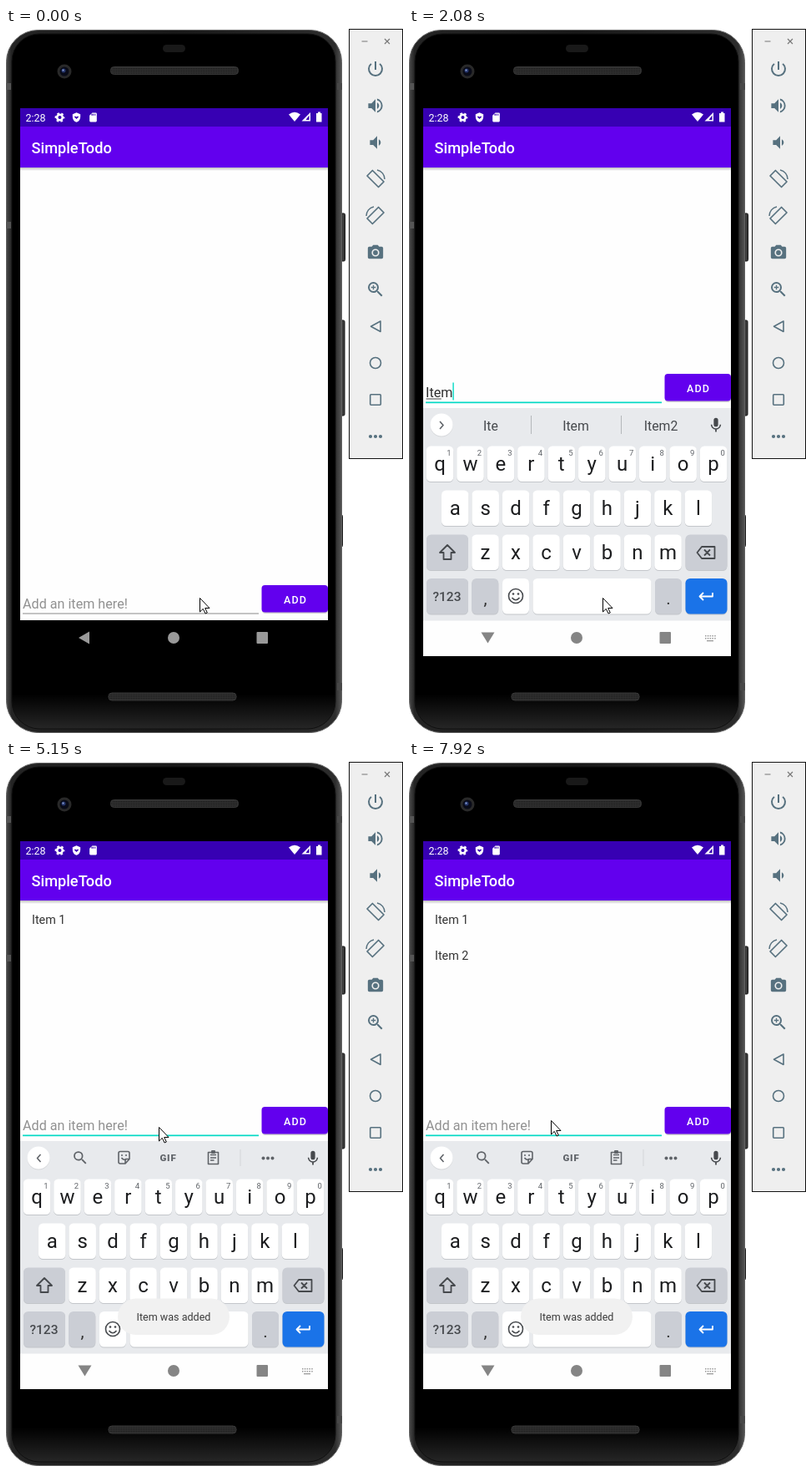
An HTML page that plays this animation: 476 by 844 pixels, repeating every 8 s.

```html
<!DOCTYPE html>
<html lang="en">
<head>
<meta charset="utf-8">
<title>Todo list demo</title>
<style>
  html, body { margin: 0; width: 100%; height: 100%; overflow: hidden; background: #fff; }
  svg { display: block; }
  text { font-family: Roboto, sans-serif; white-space: pre; }
  .mid { text-anchor: middle; }
  .key { font-size: 24px; fill: #1c1d1f; }
  .line { fill: none; stroke-linejoin: round; }
</style>
</head>
<body>
<svg id="stage" width="476" height="844" viewBox="0 0 476 844"></svg>
<script>
const LOOP = 8000;
const stage = document.getElementById('stage');
const $ = id => document.getElementById(id);

// ---- markup helpers ----
const rect = (x, y, w, h, fill, rx = 0, extra = '') =>
  `<rect x="${x}" y="${y}" width="${w}" height="${h}" fill="${fill}" rx="${rx}" ${extra}/>`;
const circle = (x, y, r, fill, extra = '') =>
  `<circle cx="${x}" cy="${y}" r="${r}" fill="${fill}" ${extra}/>`;
const path = (d, fill, extra = '') => `<path d="${d}" fill="${fill}" ${extra}/>`;
const line = (d, color, width = 1.6, extra = '') =>
  `<path class="line" d="${d}" stroke="${color}" stroke-width="${width}" ${extra}/>`;
const text = (x, y, size, fill, str, extra = '') =>
  `<text x="${x}" y="${y}" font-size="${size}" fill="${fill}" ${extra}>${str}</text>`;
const at = (x, y, body, scale = 1) => `<g transform="translate(${x} ${y}) scale(${scale})">${body}</g>`;
// Icon on a 24-unit grid, centred on (x, y).
const icon = (x, y, size, d, fill) =>
  at(x, y, `<g transform="translate(-12 -12)">${path(d, fill, 'fill-rule="evenodd"')}</g>`, size / 24);
const dots = (x, y, fill, step, r) => [-step, 0, step].map(d => circle(x + d, y, r, fill)).join('');

const LENS = 'M15.5 14h-.79l-.28-.27A6.47 6.47 0 0016 9.5 6.5 6.5 0 109.5 16c1.61 0 3.09-.59 4.23-1.57l.27.28v.79l5 5L20.5 19zm-6 0A4.5 4.5 0 119.5 5a4.5 4.5 0 010 9z';
const SPEAKER = 'M3 9v6h4l5 5V4L7 9zM14 8v8c1.5-.7 2.5-2.2 2.5-4S15.500 8.700 14 8z';
const ICONS = {
  power: 'M13 3h-2v10h2zm4.83 2.17l-1.42 1.42A7 7 0 1 1 7.580 6.580L6.170 5.170A9 9 0 1 0 17.830 5.170z',
  louder: SPEAKER + 'M14 3.230v2.060a7 7 0 0 1 0 13.420v2.060a9 9 0 0 0 0-17.540z',
  camera: 'M9 2L7.170 4H4a2 2 0 0 0-2 2v12a2 2 0 0 0 2 2h16a2 2 0 0 0 2-2V6a2 2 0 0 0-2-2h-3.170L15 2zM12 17a5 5 0 1 1 0-10 5 5 0 0 1 0 10zM12 15.200a3.200 3.200 0 1 0 0-6.400 3.200 3.200 0 0 0 0 6.400z',
  mic: 'M12 14a3 3 0 0 0 3-3V5a3 3 0 0 0-6 0v6a3 3 0 0 0 3 3zm5.300-3a5.300 5.300 0 0 1-10.600 0H5c0 3.410 2.720 6.230 6 6.720V21h2v-3.280c3.280-.48 6-3.300 6-6.720z',
  shield: 'M12 1L3 5v6c0 5.500 3.800 10.700 9 12 5.200-1.300 9-6.500 9-12V5zM12 16l-5-5 2-2 3 2 3-2 2 2z',
  card: 'M18 2h-8L4 8v12a2 2 0 0 0 2 2h12a2 2 0 0 0 2-2V4a2 2 0 0 0-2-2zM8 8h2v-4h-2zM11 8h2V4h-2zM15 8h2V4h-2z'
};

// ---- static parts ----
function phone() {
  const defs = `<defs>
    <linearGradient id="rim"><stop stop-color="#4a4a4a"/><stop offset=".015" stop-color="#242424"/>
      <stop offset=".5" stop-color="#181818"/><stop offset=".98" stop-color="#2c2c2c"/><stop offset="1" stop-color="#555"/></linearGradient>
    <linearGradient id="face" x2="0" y2="1"><stop offset=".95" stop-color="#000"/><stop offset="1" stop-color="#262626"/></linearGradient>
    <linearGradient id="drop" x2="0" y2="1"><stop stop-color="#000" stop-opacity=".25"/><stop offset="1" stop-color="#000" stop-opacity="0"/></linearGradient>
    <pattern id="mesh" width="2" height="2" patternUnits="userSpaceOnUse">${rect(0, 0, 2, 2, '#303030') + rect(0, 0, 1, 1, '#181818')}</pattern>
    <clipPath id="screen">${rect(17, 96, 369, 656, '#000')}</clipPath></defs>`;
  const grill = (x, y) => rect(x, y, 153, 9, 'url(#mesh)', 4, 'stroke="#383838"');
  const side = (y, h, w) => rect(401, y, w, h, '#3a3a3a', 1.5, 'stroke="#161616"');
  return defs + side(222, 57, 5.5) + side(350, 114, 5) + side(583, 38, 2.5) +
    rect(.5, 2.5, 402, 841, 'url(#rim)', 38, 'stroke="#626262"') +
    rect(7, 7, 388, 832, 'url(#face)', 33, 'stroke="#101010"') +
    rect(0, 66, 6, 8, '#555') + rect(0, 232, 6, 8, '#555') + rect(397, 66, 6, 8, '#484848') + rect(397, 784, 6, 9, '#484848') +
    grill(125.5, 46.5) + grill(123, 796) + rect(188, 20, 27, 9, '#191919', 4.5) +
    circle(70, 52, 8.500, '#292929') + circle(70, 52, 5.500, '#090b18') + circle(69, 51, 2.500, '#26366c') + circle(68.5, 50.5, 1, '#9aaee0');
}

function statusBar() {
  const w = '#fff';
  return rect(17, 96, 369, 22, '#3700b3') + text(23.5, 111.5, 12.5, w, '2:28') +
    circle(64.5, 107, 3.300, 'none', 'stroke="#fff" stroke-width="2.600"') +
    circle(64.5, 107, 5, 'none', 'stroke="#fff" stroke-width="1.800" stroke-dasharray="2.600 2.636" stroke-dashoffset="1.300"') +
    icon(84.5, 107, 12.5, ICONS.shield, w) + icon(104.5, 107, 13, ICONS.card, w) +
    path('M346 112l-7-8.500q7-5.500 14 0z', w) +
    path('M365 101v10.500h-10.500z', w) + path('M363.500 104.500v5.500h-4z', '#3700b3') +
    path('M372 102h2v-1.500h3V102h1.500v10.500H372z', w);
}

function appScreen() {
  return rect(17, 96, 369, 613, '#fefefe') + rect(17, 167, 369, 4, 'url(#drop)') +
    rect(17, 117, 369, 50, '#6200ee') + text(30.5, 149.5, 18.2, '#fff', 'SimpleTodo', 'font-weight="500"') +
    statusBar() +
    text(31, 194.5, 14.35, '#333', 'Item 1', 'id="item1"') +
    text(31, 237.5, 14.35, '#333', 'Item 2', 'id="item2"') +
    `<g id="field">` +
      rect(20, 700.5, 283, 1, '#8a8a8a', 0, 'id="rule"') +
      text(20, 694.5, 16.15, '#919191', 'Add an item here!', 'id="hint"') +
      text(20, 694.5, 16.15, '#2e2e2e', '', 'id="typed"') +
      rect(20.5, 696.5, 0, 1, '#444', 0, 'id="mark"') +
      rect(20, 677.5, 1.4, 21, '#03dac5', 0, 'id="caret"') +
      rect(307, 668.5, 79, 32.5, '#000', 4, 'opacity=".18"') +
      rect(306.5, 667, 79.5, 32.5, '#6200ee', 4, 'id="button"') +
      text(347, 688.500, 12.56, '#fff', 'ADD', 'class="mid" font-weight="500" letter-spacing="1.120"') +
    `</g>` +
    path('M87 730l13-7.500v15z', '#999') + circle(201, 730, 7, '#999') + rect(300.5, 723, 13.5, 14, '#999', 1);
}

function keyboard() {
  const ink = '#5f6368', dark = '#46494d', gray = '#cbced5';
  const cap = (x, y, w, fill = '#fff') => rect(x, y + 1, w, 42.5, '#c3c6ca', 5.5) + rect(x, y, w, 42.5, fill, 5.5);
  const row = (keys, x0, y, step, hints) => [...keys].map((k, i) => {
    const x = x0 + i * step;
    return cap(x - 16.200, y, 32.500) + text(x, y + 29.500, 24, '#1c1d1f', k, 'class="mid"') +
      (hints ? text(x + 11, y + 11, 9.5, ink, (i + 1) % 10, 'class="mid"') : '');
  }).join('');
  const tools = icon(89, 475, 21, LENS, ink) +
    line('M135 469.500q0-2 2-2h9q2 0 2 2v7l-5 5.500h-6q-2 0-2-2zM148 476.500h-3q-2 0-2 2v3M138.500 475q3 4 6 1', ink) +
    circle(139, 472, 1, ink) + circle(144, 472, 1, ink) +
    text(194.5, 479, 11.5, ink, 'GIF', 'class="mid" font-weight="900" letter-spacing=".8"') +
    line('M242.500 468.500h12v14h-12zM245 471.500h7M245 475h7M245 478h4.500', ink) + rect(246, 466, 5, 4, ink, 1) +
    rect(280.500, 465, 1, 20, '#d3d6d9') + dots(314, 475.500, ink, 5.5, 2) +
    line('M41.500 471l-4 4.500 4 4.500', ink);
  const words = [98, 200, 302].map((x, i) => text(x, 481.5, 15.8, dark, '', `class="mid" id="word${i}"`)).join('') +
    rect(146, 464, 1, 22, '#b4b7bb') + rect(254, 464, 1, 22, '#b4b7bb') + line('M37 471l4 4.500-4 4.500', ink);
  const mini = [0, 1, 2, 3, 4].map(i => rect(355 + i * 2.8, 727, 1.500, 1.500, '#999') + rect(355 + i * 2.8, 730, 1.500, 1.500, '#999')).join('');
  return `<g id="keys">` + rect(17, 455, 369, 297, '#e8eaed') + rect(17, 709.5, 369, 42.5, '#fefefe') +
    circle(39, 476, 13.500, '#d5d7da') + circle(39, 475, 13.500, '#fff') +
    `<g id="tools">${tools}</g><g id="words">${words}</g>` + icon(368, 475.5, 21, ICONS.mic, dark) +
    row('qwertyuiop', 37, 500.5, 36.450, true) + row('asdfghjkl', 55.2, 553.500, 36.450) + row('zxcvbnm', 91.5, 606.5, 36.500) +
    cap(21, 606.500, 50, gray) + line('M46 619l-9 9h4.500v8h9v-8h4.500z', dark, 1.800) +
    cap(331.500, 606.500, 50, gray) + line('M351 621h15.500v14H351l-5.500-7zM354 624.500l7 7M361 624.500l-7 7', dark, 1.800) +
    cap(21, 659, 50, gray) + text(45.500, 686, 15.5, dark, '?123', 'class="mid" font-weight="500"') +
    cap(75.300, 659, 32, gray) + text(91.5, 689.500, 21, '#333', ',', 'class="mid"') +
    cap(112, 659, 32) + circle(128, 680, 8.500, 'none', `stroke="${dark}" stroke-width="1.600"`) +
    circle(125, 677.500, 1.300, dark) + circle(131, 677.500, 1.300, dark) + line('M123.500 682q4.500 5.500 9 0', dark) +
    cap(148.500, 659, 142) + cap(295, 659, 32, gray) + text(311, 689.500, 21, '#333', '.', 'class="mid"') +
    cap(331.500, 659, 50, '#1a73e8') + line('M364 676v4.500h-15M353 676l-4.500 4.500 4.500 4.500', '#fff', 1.800) +
    path('M86.500 723.500h16l-8 13z', '#858585') + circle(201, 730, 7, '#858585') + rect(300.5, 723, 13.5, 14, '#858585', 1) +
    mini + rect(357, 733, 8, 1.300, '#999') + `</g>`;
}

function sidebar() {
  const c = '#57717f';
  const turn = line('M-3.600-10.500L10 3 3.600 9.500-10-4z', c, 1.700) + line('M2-11a11 11 0 0 1 9 11', c, 1.500);
  return rect(411.5, 1.5, 64, 514, '#efefef', 0, 'stroke="#111"') +
    line('M426.500 16h7M454 13l6 6M460 13l-6 6', '#777', 1.200) +
    icon(443, 49, 24, ICONS.power, c) + icon(443, 93, 23, ICONS.louder, c) + icon(445, 137, 23, SPEAKER, c) +
    at(443, 181, turn) + `<g transform="translate(443 225) scale(-1 1)">${turn}</g>` +
    icon(443, 269, 22, ICONS.camera, c) + icon(443, 313, 24, LENS, c) +
    line('M437.700 310.500h5.600M440.500 307.700v5.600', c, 1.300) +
    line('M449 351v12.500l-11.500-6.250z', c) + circle(443, 401, 6.500, 'none', `stroke="${c}" stroke-width="1.600"`) +
    rect(436.700, 438.700, 12.600, 12.600, 'none', 1, `stroke="${c}" stroke-width="1.600"`) + dots(443, 489, c, 6, 2.100);
}

stage.innerHTML = phone() + appScreen() + `<g clip-path="url(#screen)">${keyboard()}</g>` +
  `<g id="toast">${rect(134, 643.500, 134, 43.500, '#f1f1f1', 21.700)}${text(201, 670.300, 12.56, '#3c3c3c', 'Item was added', 'class="mid"')}</g>` +
  sidebar() + path('M.5.500v16.500l3.800-3.600 2.800 5.600 2.200-1-2.600-5.500h5.300z', '#fff', 'id="pointer" stroke="#000"');

// ---- timeline: each step changes part of the state and holds ----
const PLAIN = '#6200ee', PRESSED = '#823af1';
const NOUNS = ['Item', 'Item2', 'Items'], STEMS = ['Ite', 'Item', 'Item2'];
const steps = [
  [0, { focus: 0, up: 0, caret: 0, typed: '', marked: 0, words: null, slide: 0, keys: 0, item1: 0, item2: 0, toast: 0, button: PLAIN, x: 232, y: 682 }],
  [390, { focus: 1, caret: 1 }],
  [540, { up: 1, slide: 180, keys: .3 }],
  [660, { slide: 93, keys: .65 }],
  [780, { slide: 40, keys: .86 }],
  [900, { slide: 10, keys: .97 }],
  [1020, { slide: 0, keys: 1 }],
  [1540, { caret: 0 }],
  [1840, { typed: 'I', marked: 1, caret: 1 }],
  [1960, { typed: 'Ite', marked: 3, words: STEMS }],
  [2080, { typed: 'Item' }],
  [2200, { typed: 'Item ', marked: 4, words: NOUNS }],
  [2350, { typed: 'Item 12', marked: 0, words: null }],
  [2880, { caret: 0 }],
  [3160, { typed: 'Item 1', caret: 1 }],
  [3430, { x: 246, y: 640 }],
  [3580, { x: 414, y: 460, caret: 0 }],
  [3730, { x: 375, y: 438 }],
  [3850, { x: 345, y: 432 }],
  [3970, { x: 335, y: 440 }],
  [4130, { x: 323, y: 446, typed: '', caret: 1, button: PRESSED, item1: .04, toast: .04 }],
  [4280, { item1: 1, toast: .4, button: '#701cef' }],
  [4400, { x: 290, y: 446, toast: .8, button: PLAIN }],
  [4520, { x: 235, y: 441, toast: 1 }],
  [4640, { x: 195, y: 438 }],
  [4760, { x: 183, y: 438 }],
  [5150, { caret: 0 }],
  [5680, { typed: 'I', marked: 1, caret: 1 }],
  [5930, { typed: 'Ite', marked: 3, words: STEMS }],
  [6050, { typed: 'Item', marked: 4, words: NOUNS }],
  [6170, { typed: 'Item ' }],
  [6290, { typed: 'Item 2', marked: 0, words: null }],
  [6410, { toast: .7 }],
  [6530, { toast: .3 }],
  [6650, { toast: 0 }],
  [6770, { x: 260, y: 436, caret: 0 }],
  [6890, { x: 349, y: 432 }],
  [7170, { x: 354, y: 425 }],
  [7290, { button: '#5600e4' }],
  [7410, { typed: '', caret: 1, button: PRESSED, item2: .04, toast: .04 }],
  [7530, { item2: 1, toast: .6, button: PLAIN }],
  [7680, { x: 300, y: 434, toast: .9 }],
  [7800, { x: 205, y: 431, toast: 1 }],
  [7920, { x: 170, y: 430, caret: 0 }]
];

function set(id, attrs) {
  for (const name in attrs) $(id).setAttribute(name, attrs[name]);
}
const show = (id, alpha) => set(id, { opacity: alpha });

function draw(s) {
  set('field', { transform: `translate(0 ${s.up ? -253 : 0})` });
  set('rule', s.focus ? { fill: '#03dac5', height: 1.700 } : { fill: '#8a8a8a', height: 1 });
  show('hint', s.typed ? 0 : 1);
  const typed = $('typed');
  typed.textContent = s.typed;
  set('mark', { width: s.marked ? typed.getSubStringLength(0, s.marked) : 0 });
  set('caret', { x: 20 + (s.typed ? typed.getComputedTextLength() : 0), opacity: s.caret });
  set('button', { fill: s.button });
  set('keys', { transform: `translate(0 ${s.slide})`, opacity: s.keys });
  show('tools', s.words ? 0 : 1);
  show('words', s.words ? 1 : 0);
  if (s.words) s.words.forEach((word, i) => { $('word' + i).textContent = word; });
  ['item1', 'item2', 'toast'].forEach(id => show(id, s[id]));
  set('pointer', { transform: `translate(${s.x} ${s.y})` });
}

const start = performance.now();
function tick() {
  const t = Math.max(0, performance.now() - start) % LOOP;
  draw(Object.assign({}, ...steps.filter(step => step[0] <= t).map(step => step[1])));
  requestAnimationFrame(tick);
}
tick();
</script>
</body>
</html>
```
